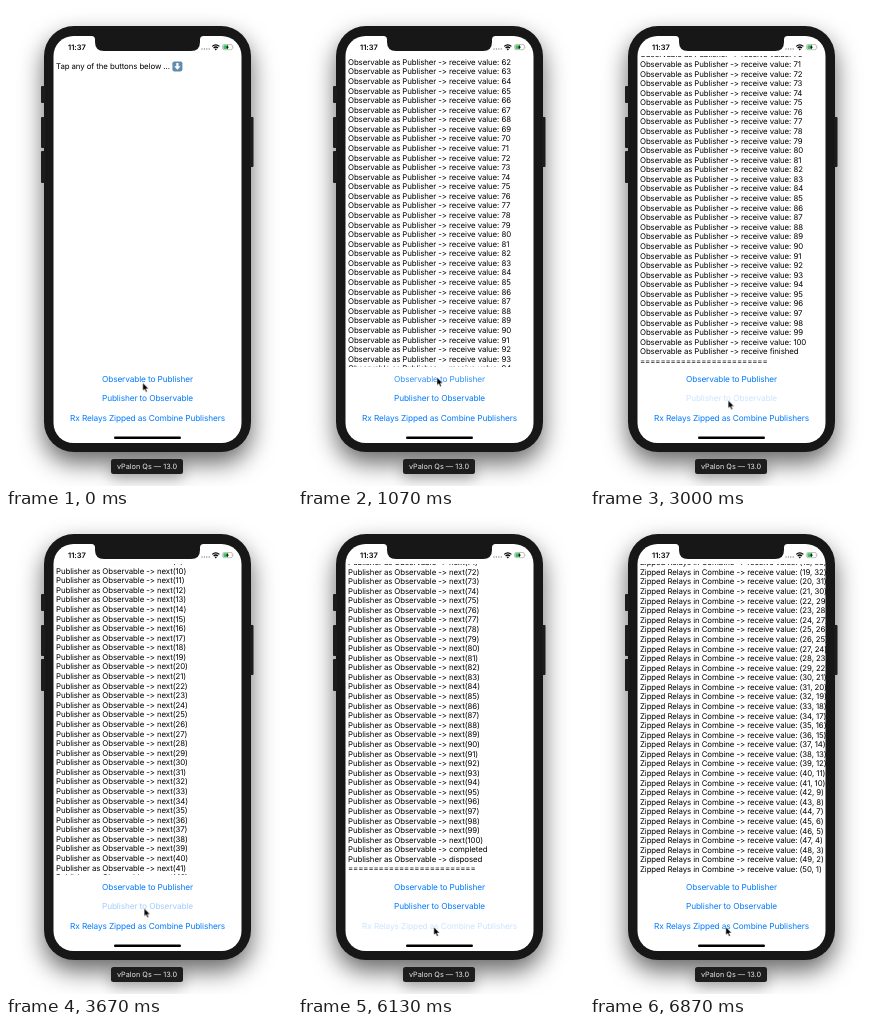
Animation, 286 px wide and 480 px high, one loop 7470 ms. Source, as an HTML page:

```html
<!DOCTYPE html>
<html lang="en">
<head>
<meta charset="utf-8">
<title>Stream bridge demo</title>
<style>
  html, body { margin: 0; width: 100%; height: 100%; overflow: hidden; background: #fff; }
  body {
    position: relative;
    font-family: Inter, "Liberation Sans", sans-serif;
    font-variant-ligatures: none;
    font-feature-settings: "calt" 0, "liga" 0;
    text-rendering: geometricPrecision;
    --loop: 7470ms;
  }
  svg, .phone, .label, .logs, .log { position: absolute; }
  svg { left: 0; top: 0; }
  .phone {
    left: 38px; top: 20.3px; width: 207px; height: 426px; border-radius: 30px;
    background: #171717;
    box-shadow: 0 11px 25px rgba(0, 0, 0, .6);
  }
  .label {
    left: 105px; top: 453px; width: 72px; height: 15px; border-radius: 2.5px;
    background: #1d1d1d;
    box-shadow: 0 5px 14px rgba(0, 0, 0, .3);
  }

  /* text view */
  .logs { left: 47.5px; top: 50px; width: 188px; height: 311px; overflow: hidden; }
  .log {
    left: 2.5px; top: 5.5px; margin: 0;
    font: 7.85px/9.58px Inter, "Liberation Sans", sans-serif;
    letter-spacing: -.088px; white-space: pre; color: #000;
  }
  .log svg { left: 116px; top: -.2px; }
  #intro { animation: show0 var(--loop) step-end infinite; }
  #log1 { animation: show1 var(--loop) step-end infinite, scroll1 var(--loop) infinite; }
  #log2 { animation: show2 var(--loop) step-end infinite, scroll2 var(--loop) infinite; }
  #log3 { animation: show3 var(--loop) step-end infinite, scroll3 var(--loop) infinite; }
  @keyframes show0 { 0% { visibility: visible } 11.647%, 100% { visibility: hidden } }
  @keyframes show1 { 0% { visibility: hidden } 11.647% { visibility: visible } 48.193%, 100% { visibility: hidden } }
  @keyframes show2 { 0% { visibility: hidden } 48.193% { visibility: visible } 85.676%, 100% { visibility: hidden } }
  @keyframes show3 { 0% { visibility: hidden } 85.676%, 100% { visibility: visible } }
  @keyframes scroll1 {
    0%, 11.695% { transform: translateY(0); animation-timing-function: ease-in-out }
    15.203%, 100% { transform: translateY(-672.2px) }
  }
  @keyframes scroll2 {
    0%, 48.26% { transform: translateY(0); animation-timing-function: ease-in-out }
    51.767%, 100% { transform: translateY(-681.8px) }
  }
  @keyframes scroll3 {
    0%, 85.79% { transform: translateY(0); animation-timing-function: ease-in-out }
    89.297%, 100% { transform: translateY(-174px) }
  }

  /* buttons dim while held and fade back on release */
  .btn {
    font-size: 8.27px; letter-spacing: -.11px; fill: #007aff; text-anchor: middle;
    --release: cubic-bezier(0, .35, .6, 1);
  }
  #btn1 { animation: press1 var(--loop) linear infinite; }
  #btn2 { animation: press2 var(--loop) linear infinite; }
  #btn3 { animation: press3 var(--loop) linear infinite; }
  @keyframes press1 {
    0%, 2.677% { opacity: 1 }
    3.614%, 11.647% { opacity: .2; animation-timing-function: var(--release) }
    17.4%, 100% { opacity: 1 }
  }
  @keyframes press2 {
    0%, 39.357% { opacity: 1 }
    40.16%, 48.193% { opacity: .2; animation-timing-function: var(--release) }
    53.949%, 100% { opacity: 1 }
  }
  @keyframes press3 {
    0%, 80.857% { opacity: 1 }
    82.062%, 85.676% { opacity: .2; animation-timing-function: var(--release) }
    91.432%, 100% { opacity: 1 }
  }

  #cursor { animation: move var(--loop) ease-in-out infinite; }
  @keyframes move {
    0%, .8% { transform: translate(136.7px, 376.7px) }
    3.5%, 30.2% { transform: translate(139px, 371.3px) }
    36.145% { transform: translate(139px, 404.5px) }
    39.491%, 70.4% { transform: translate(138.2px, 394.3px) }
    73.628% { transform: translate(128.9px, 408px) }
    77.4%, 100% { transform: translate(135.8px, 413px) }
  }
</style>
</head>
<body>
<div class="phone"></div>
<div class="label"></div>

<svg width="286" height="480" viewBox="0 0 286 480">
  <g fill="#1c1c1c">
    <rect x="35" y="80" width="4" height="17" rx="1"/>
    <rect x="35" y="111" width="4" height="31" rx="1"/>
    <rect x="35" y="145" width="4" height="32" rx="1"/>
    <rect x="244" y="111" width="3.5" height="50" rx="1"/>
  </g>
  <rect x="47.5" y="30" width="188" height="407" rx="20" fill="#fff"/>
  <path d="M85.5 29.5V30Q89 30 89 33.5V36Q89 45 98 45H185Q194 45 194 36V33.5Q194 30 197.5 30V29.5Z" fill="#171717"/>

  <text x="62" y="43.8" font-size="7.5" font-weight="600">11:37</text>
  <g fill="#8a8a8a">
    <circle cx="196" cy="43" r=".7"/><circle cx="198.4" cy="43" r=".7"/>
    <circle cx="200.8" cy="43" r=".7"/><circle cx="203.2" cy="43" r=".7"/>
  </g>
  <g fill="none" stroke="#000" stroke-width="1.25">
    <path d="M206.2 40.4Q209.8 37.2 213.4 40.4"/>
    <path d="M207.6 42Q209.8 40 212 42"/>
  </g>
  <path d="M208.6 43.1Q209.8 42.1 211 43.1L209.8 44.4Z"/>
  <rect x="216.6" y="38.5" width="9.8" height="5.2" rx="1.5" fill="none" stroke="#999" stroke-width=".6"/>
  <path d="M227.1 40.2Q228 41.1 227.1 42Z" fill="#999"/>
  <rect x="217.4" y="39.3" width="4.6" height="3.6" rx=".7" fill="#35c759"/>
  <path d="M222 38.7L220 41.4H221.4L220.9 43.6L223 40.8H221.6Z"/>

  <text id="btn1" class="btn" x="141.5" y="375.6">Observable to Publisher</text>
  <text id="btn2" class="btn" x="141.5" y="395.2">Publisher to Observable</text>
  <text id="btn3" class="btn" x="141.5" y="414.8">Rx Relays Zipped as Combine Publishers</text>

  <rect x="108" y="430.4" width="67" height="2.6" rx="1.3"/>
  <text x="141" y="463.2" font-size="7.3" fill="#e6e6e6" text-anchor="middle">vPalon Qs — 13.0</text>
</svg>

<div class="logs">
  <div id="intro" class="log">Tap any of the buttons below ...<svg width="11" height="11" viewBox="0 0 11 11">
    <rect x=".4" y=".4" width="10" height="10" rx="1.8" fill="#5f8db0"/>
    <path d="M4.3 1.9H6.5V5.2H8.6L5.4 8.8L2.2 5.2H4.3Z" fill="#fff"/>
  </svg></div>
  <div id="log1" class="log"></div>
  <div id="log2" class="log"></div>
  <div id="log3" class="log"></div>
</div>

<svg width="286" height="480" viewBox="0 0 286 480">
  <path id="cursor" d="M0 0V8L1.9 6.4L3.1 9.3L4.5 8.8L3.3 5.9H5.8Z" stroke="#fff" stroke-width=".5"/>
</svg>

<script>
  const rule = "=".repeat(25);
  const count = (n, line) => Array.from({ length: n }, (_, i) => line(i + 1));
  const fill = (id, lines) => { document.getElementById(id).textContent = lines.join("\n"); };

  const toPub = "Observable as Publisher -> receive ";
  const toObs = "Publisher as Observable -> ";
  fill("log1", [...count(100, i => `${toPub}value: ${i}`), toPub + "finished", rule]);
  fill("log2", [...count(100, i => `${toObs}next(${i})`), toObs + "completed", toObs + "disposed", rule]);
  fill("log3", count(50, i => `Zipped Relays in Combine -> receive value: (${i}, ${51 - i})`));
</script>
</body>
</html>
```
